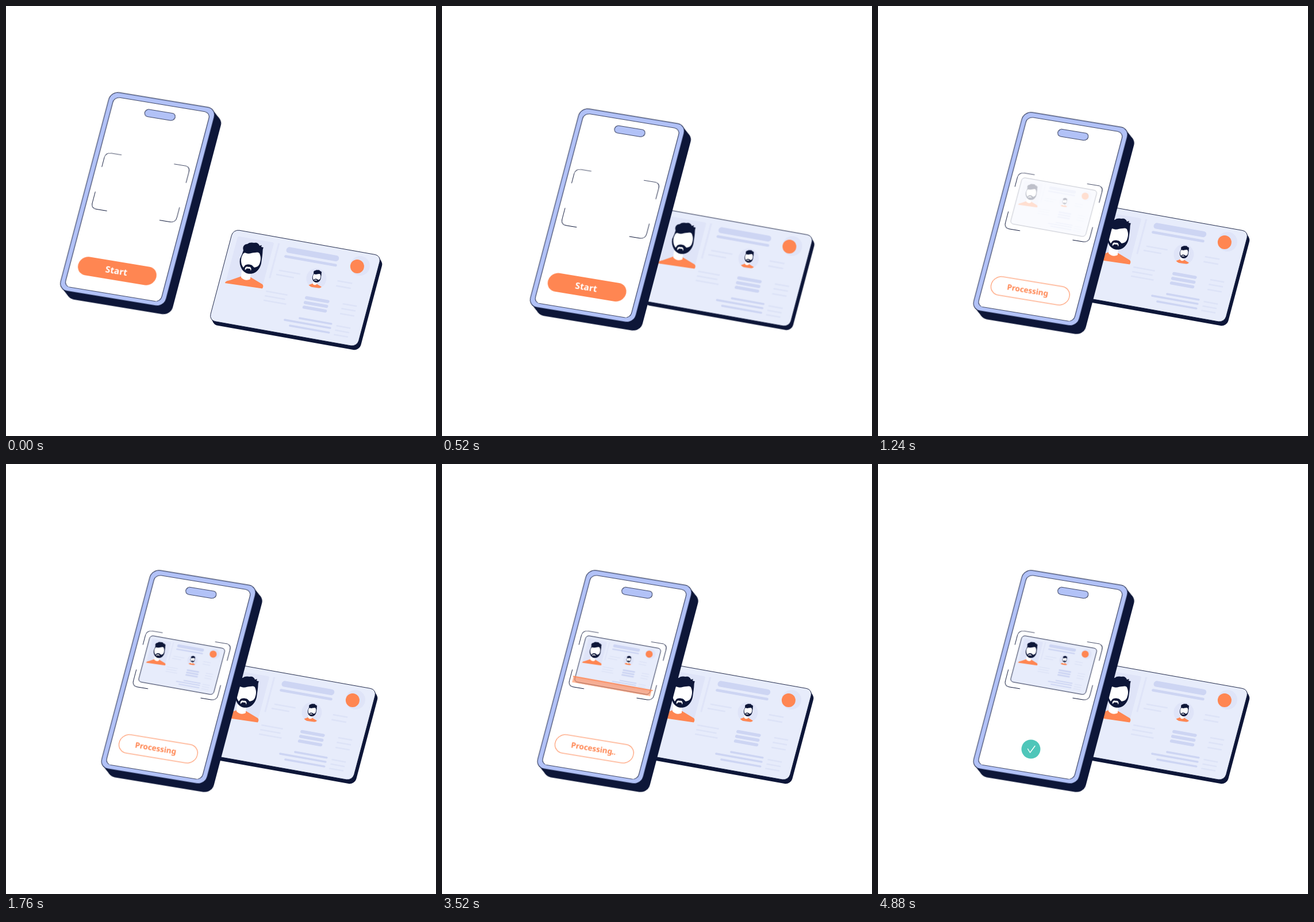
An HTML page without scripts that plays this animation: 748 by 748 pixels, repeating every 5.08 s.

```html
<!DOCTYPE html>
<html lang="en">
<head>
<meta charset="utf-8">
<title>Document scan</title>
<style>
  html, body { margin: 0; width: 100%; height: 100%; overflow: hidden; background: #fff; }
  svg { display: block; width: 100vw; height: 100vh; }
  text { font-family: "Noto Sans", "Open Sans", sans-serif; font-weight: 600; }

  .navy { fill: #0d1638; }
  .orange { fill: #ff8652; }
  .pale { fill: #dfe4f8; }
  .edge { stroke: #0d1638; stroke-width: .9; vector-effect: non-scaling-stroke; }
  .bars { fill: none; stroke: #cdd5f3; stroke-linecap: round; }
  .faint { fill: none; stroke: #dde3f7; stroke-width: 2.6; }

  .phone, .card, .start, .busy, .mini, .scan, .sweep, .dot, .done {
    animation: 5080ms linear infinite;
  }
  .phone { animation-name: phone; }
  .card { animation-name: card; }
  .start { animation-name: start; }
  .busy { animation-name: busy; }
  .mini { animation-name: mini; }
  .scan { animation-name: scan; }
  .sweep { animation-name: sweep; }
  .done { animation-name: done; }
  .dot { animation-name: dot; transform: scale(0); transform-box: fill-box; transform-origin: center; }
  .dot:nth-of-type(2) { animation-delay: 140ms; }
  .dot:nth-of-type(3) { animation-delay: 280ms; }

  @keyframes phone {
    0% { transform: translate(-71.5px, -34.5px); animation-timing-function: ease; }
    19.69%, 100% { transform: none; }
  }
  @keyframes card {
    0% { transform: translate(8px, 42px); animation-timing-function: ease; }
    19.69%, 100% { transform: none; }
  }
  @keyframes start {
    0%, 14.57% { opacity: 1; animation-timing-function: ease-in-out; }
    22.05%, 100% { opacity: 0; }
  }
  @keyframes busy {
    0%, 14.57% { opacity: 0; animation-timing-function: ease-in-out; }
    22.05%, 79.53% { opacity: 1; animation-timing-function: ease-in-out; }
    87.4%, 100% { opacity: 0; }
  }
  @keyframes mini {
    0%, 22.05% { opacity: 0; animation-timing-function: ease; }
    34.65%, 100% { opacity: 1; }
  }
  @keyframes scan {
    0%, 40.16% { opacity: 0; animation-timing-function: ease; }
    50.4%, 72.83% { opacity: 1; }
    78.74%, 100% { opacity: 0; }
  }
  @keyframes sweep {
    0%, 59.06% { transform: none; animation-timing-function: ease; }
    74.8%, 100% { transform: translateY(81px); }
  }
  @keyframes dot {
    0%, 41.73% { transform: scale(0); }
    47.24%, 54.33% { transform: scale(1); }
    58.27%, 62.2% { transform: scale(0); }
    67.72%, 92% { transform: scale(1); }
    93%, 100% { transform: scale(0); }
  }
  @keyframes done {
    0%, 85.04% { transform: scale(0); animation-timing-function: ease; }
    95.67%, 100% { transform: scale(1); }
  }
</style>
</head>
<body>
<svg viewBox="0 0 748 748" xmlns="http://www.w3.org/2000/svg">
  <defs>
    <linearGradient id="glow" x1="0" y1="0" x2="0" y2="1">
      <stop offset="0" stop-color="#ff8652" stop-opacity=".65"/>
      <stop offset="1" stop-color="#ff8652" stop-opacity="0"/>
    </linearGradient>
    <clipPath id="window"><rect x="-2" y="0" width="146" height="84"/></clipPath>
    <clipPath id="round"><circle cx="540" cy="474" r="17.5"/></clipPath>

    <g id="man">
      <path class="orange" d="M381 482C382 478 386 478 390 477L410 470L426 472L446 484Q449 487 446 491.5Z"/>
      <path fill="#fff" d="M410 460L426 462L425 475C420 478 413 477 409 472Z"/>
      <path class="navy" d="M413 425C411 418 415 414 420 414C423 411 428 411 432 412C436 411 440 413 441 417L445 416L444 419L448 420C446 424 447 428 446 434L444 448C442 457 436 464 428 465.5C420 467 413 463 410 457C407 452 406 446 407 440L411 431Z"/>
      <path fill="#fff" d="M412 432Q414 428 418 430C423 432 428 429 433 429C438 428 441 428 442 433C444 438 443 444 441 449C439 453 436 454 432 455L428 451C424 449 419 449 416 451L413 455C410 451 409 447 409 442Q409 437 412 432Z"/>
      <path fill="#fff" d="M416 459.5C415 455 418 452.5 421.5 454C425 452.5 428 456 426 460.5L424.5 457L419 456.5Z"/>
    </g>

    <!-- card face, top left corner at 0,0 -->
    <g id="face">
      <g transform="matrix(.9846 .176 -.2567 .9665 0 0)">
        <rect class="edge" width="261.7" height="164" rx="11" fill="#e7ecfb"/>
        <rect class="pale" x="11" y="10.5" width="64" height="81" rx="3"/>
        <rect class="pale" x="82" y="10" width="3" height="63"/>
        <g class="bars">
          <path stroke-width="10.5" d="M104 18.5H186.3"/>
          <path stroke-width="4.5" d="M100.6 30.5H189"/>
          <path stroke-width="5.5" d="M154.5 95.2H192M154.5 103.8H192M154.5 112.2H192"/>
          <path stroke-width="3.5" d="M152 132.4H207.8M127.6 139.9H207.8M138.9 148.2H207.8"/>
        </g>
        <path class="faint" d="M95.7 56.5H133M92.7 64.5H124M83 96.4H121M83 104.5H119M83 112.5H123
          M199 56.5H225M199 65.5H225M218 94.4H243M218 103H243M218 112H243M217 134H242M217 142H242M217 150H242"/>
      </g>
      <g transform="translate(-395.3 -388.3)">
        <use href="#man"/>
        <circle class="pale" cx="540" cy="474" r="17.5"/>
        <g clip-path="url(#round)">
          <use href="#man" transform="translate(370.2 294.6) scale(.4)"/>
        </g>
        <circle class="pale" cx="616" cy="452" r="17"/>
        <circle class="orange" cx="611" cy="453" r="12"/>
      </g>
    </g>
  </defs>

  <g class="card">
    <g transform="translate(387.2 346.3)">
      <g class="navy" transform="matrix(.9846 .176 -.2567 .9665 0 0)">
        <rect x="5.6" y="6.3" width="261.7" height="164" rx="11"/>
        <path d="M258.9 3.7l5.6 6.3L8.4 166.6l-5.6-6.3Z"/>
      </g>
      <use href="#face"/>
    </g>
  </g>

  <g class="phone">
    <g transform="matrix(.9866 .163 -.2553 .967 253.9 182.7)">
      <g class="navy">
        <rect x="15" y="12.7" width="186" height="357" rx="15"/>
        <path d="M180.7 3.5l15 12.7L20.3 366.1l-15-12.7Z"/>
      </g>
      <rect class="edge" width="186" height="357" rx="15" fill="#b2c2f7"/>

      <g transform="translate(.7 .6)">
        <rect class="edge" x="7.5" y="8" width="169.5" height="341" rx="10" fill="#fff"/>
        <rect class="edge" x="66" y="19.8" width="53.5" height="13" rx="6.5" fill="#b2c2f7"/>
        <path class="edge" fill="none" d="M17.8 132.5V116.3q0-10 10-10H45.8M138.5 106.8H157.2q10 0 10 10V136
          M17.8 177V196.8q0 10 10 10H46M167.2 180V197.8q0 10-10 10H139"/>

        <g class="busy">
          <rect x="21.4" y="291" width="137.6" height="33" rx="16.5" fill="none" stroke="#ff8652"/>
          <text class="orange" transform="translate(49.7 312) skewX(5.4)" font-size="13.5">Processing</text>
          <g class="orange">
            <circle class="dot" cx="123.2" cy="311" r="1.2"/>
            <circle class="dot" cx="126.8" cy="311" r="1.2"/>
            <circle class="dot" cx="130.4" cy="311" r="1.2"/>
          </g>
        </g>
        <g class="start">
          <rect class="orange" x="21.4" y="291" width="137.6" height="33" rx="16.5"/>
          <text transform="translate(89.3 313.2) skewX(5.4)" font-size="15.5" fill="#fff" text-anchor="middle">Start</text>
        </g>
      </g>
    </g>

    <g class="mini">
      <use href="#face" transform="translate(251 298) scale(.507)"/>
    </g>

    <g class="scan">
      <g transform="matrix(.9846 .176 -.2567 .9665 247 297.5)">
        <g clip-path="url(#window)">
          <rect class="sweep" x="1" width="138" height="80" fill="url(#glow)"/>
        </g>
        <path class="sweep" d="M0 0H141" stroke="#ff8652" stroke-width="1.6"/>
      </g>
    </g>

    <g transform="translate(266 496)">
      <g class="done">
        <circle r="16.5" fill="#4fc6b9"/>
        <path d="M-5.5-.5L-1.5 6L7-5.5" fill="none" stroke="#fff" stroke-width="1.4" stroke-linecap="round" stroke-linejoin="round"/>
      </g>
    </g>
  </g>
</svg>
</body>
</html>
```
